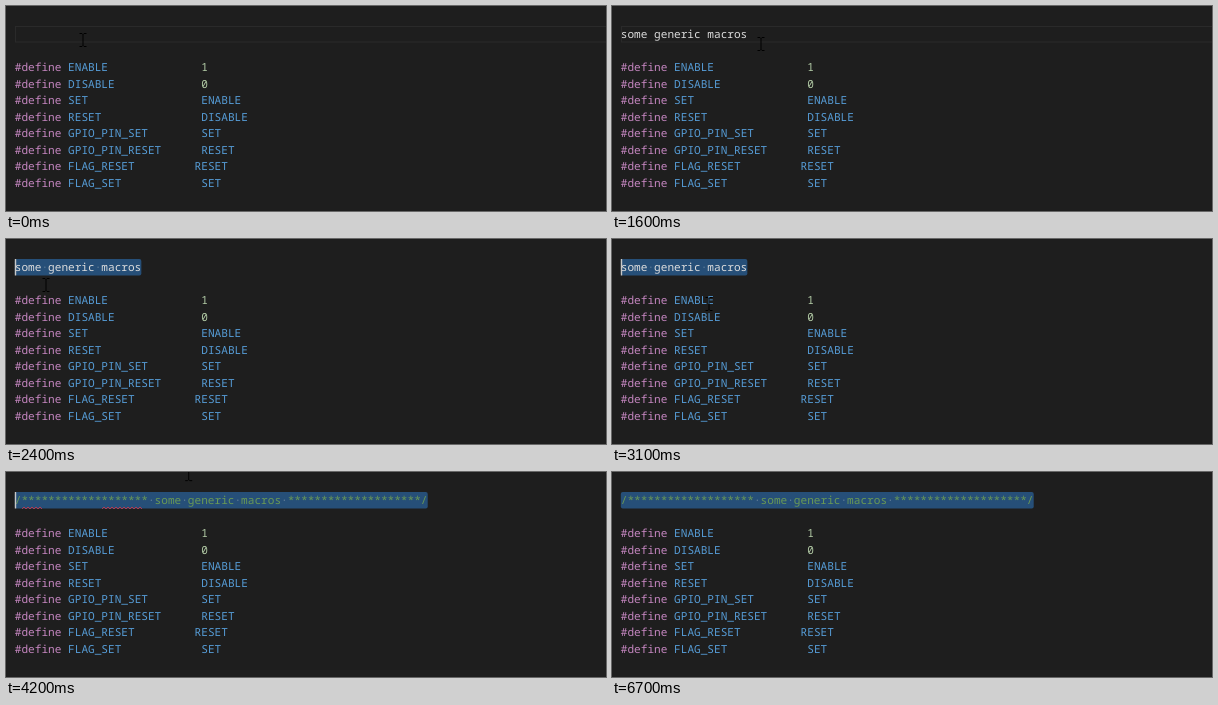
Write an HTML page that moves like this. It is 600 by 205 pixels and loops after 6.8 s.

```html
<!DOCTYPE html>
<html lang="en">
<head>
<meta charset="utf-8">
<title>Macro comment</title>
<style>
  html, body { margin: 0; width: 100%; height: 100%; overflow: hidden; background: #1e1e1e; }
  svg { display: block; }
  text {
    font: 11.1px "Noto Sans Mono", "DejaVu Sans Mono", monospace;
    white-space: pre;
    text-rendering: geometricPrecision;
  }
</style>
</head>
<body>
<svg id="stage" width="600" height="205" viewBox="0 0 600 205">
  <rect id="line" x="9.5" y="20.5" width="600" height="15.5" fill="none" stroke="#2a2a2a"/>
  <rect id="selection" y="20" height="16.5" rx="2" fill="#264f78"/>
  <g id="code"></g>
  <text id="dots" y="32.4" fill="#e3e4e2" fill-opacity=".3"></text>
  <text id="typed" x="8.8" y="32.4"></text>
  <path id="wave1" fill="none" stroke="#c23a50" stroke-width=".9"/>
  <path id="wave2" fill="none" stroke="#c23a50" stroke-width=".9"/>
  <rect id="caret" y="20" width="1.4" height="16.5" fill="#c8c8c8"/>
  <path id="mouse" d="M-3.5-6.5h2.5l1 1l1-1h2.5M0-5.5v11M-3.5 6.5h2.5l1-1l1 1h2.5" fill="none" stroke="#000"/>
</svg>
<script>
const LOOP = 6800, STEP = 100, LEFT = 8.8, CHAR = 6.66, ROW = 16.5;
const PHRASE = "some generic macros";
const COMMENT = "/" + "*".repeat(19) + " " + PHRASE + " " + "*".repeat(20) + "/";
const TYPE_START = 100, TYPE_END = 1100, DRAG_START = 1700, DRAG_END = 2100, CONVERT = 3200;

const $ = id => document.getElementById(id);
const set = (id, attrs) => {
  for (const name in attrs) $(id).setAttribute(name, attrs[name]);
};
const show = (id, on) => set(id, { visibility: on ? "visible" : "hidden" });
const clamp = (v, lo, hi) => Math.min(hi, Math.max(lo, v));
const column = n => LEFT + n * CHAR;

const macros = [
  ["ENABLE", "1"], ["DISABLE", "0"], ["SET", "ENABLE"], ["RESET", "DISABLE"],
  ["GPIO_PIN_SET", "SET"], ["GPIO_PIN_RESET", "RESET"],
  ["FLAG_RESET", "RESET", 27], ["FLAG_SET", "SET"]
];

function addText(str, col, y, fill) {
  const el = document.createElementNS("http://www.w3.org/2000/svg", "text");
  el.setAttribute("x", column(col));
  el.setAttribute("y", y);
  el.setAttribute("fill", fill);
  el.textContent = str;
  $("code").append(el);
}

macros.forEach(([name, value, col = 28], i) => {
  const y = 65.4 + i * ROW;
  addText("#define", 0, y, "#c586c0");
  addText(name, 8, y, "#569cd6");
  addText(value, col, y, /\d/.test(value) ? "#b5cea8" : "#569cd6");
});

function wave(x, end) {
  let d = `M${x} 37`;
  for (let i = 1; x + i * 2 <= end; i++) d += `L${x + i * 2} ${i % 2 ? 35 : 37}`;
  return d;
}
set("wave1", { d: wave(16, 36) });
set("wave2", { d: wave(96, 136) });

// Pointer path: time, x, y
const path = [
  [0, 77, 34], [1200, 77, 34], [1600, 149, 38], [1700, 137, 31], [2100, 8, 30],
  [2400, 40, 46], [3100, 97, 65], [3600, 139, 75], [4300, 190, -10], [LOOP, 190, -10]
];

function pointer(t) {
  const i = path.findIndex(p => p[0] > t);
  const [t0, x0, y0] = path[i - 1], [t1, x1, y1] = path[i];
  const k = (t - t0) / (t1 - t0);
  return [x0 + (x1 - x0) * k, y0 + (y1 - y0) * k];
}

function caretOn(t) {
  if (t < TYPE_START) return false;
  if (t < TYPE_END) return true;
  if (t >= DRAG_START && t < DRAG_END) return true;
  const since = t < DRAG_START ? TYPE_END : t < CONVERT ? DRAG_END : CONVERT;
  return (t - since) % 1000 < 500;
}

function draw(time) {
  const t = Math.floor((time % LOOP) / STEP) * STEP;
  const converted = t >= CONVERT;
  const typed = clamp((t - TYPE_START + STEP) / (TYPE_END - TYPE_START), 0, 1);
  const str = converted ? COMMENT : PHRASE.slice(0, Math.floor(typed * PHRASE.length));
  const drag = clamp((t - DRAG_START) / (DRAG_END - DRAG_START), 0, 1);
  const from = Math.round(str.length * (1 - drag));
  const selected = drag > 0;

  $("typed").textContent = str;
  set("typed", { fill: converted ? "#6a9955" : "#dcdcdc" });
  $("dots").textContent = selected ? str.slice(from).replace(/[^ ]/g, " ").replace(/ /g, (m, i) => str[from + i] === " " ? "·" : " ") : "";
  set("dots", { x: column(from) });

  show("line", !selected);
  show("selection", selected);
  set("selection", { x: column(from), width: (str.length - from) * CHAR });
  set("caret", { x: column(from) });
  show("caret", caretOn(t));
  show("wave1", converted && t < 5600);
  show("wave2", converted && t < 6000);
  set("mouse", { transform: `translate(${pointer(t)})` });
}

let start;
function tick(now) {
  start ??= now;
  draw(now - start);
  requestAnimationFrame(tick);
}
draw(0);
requestAnimationFrame(tick);
</script>
</body>
</html>
```
